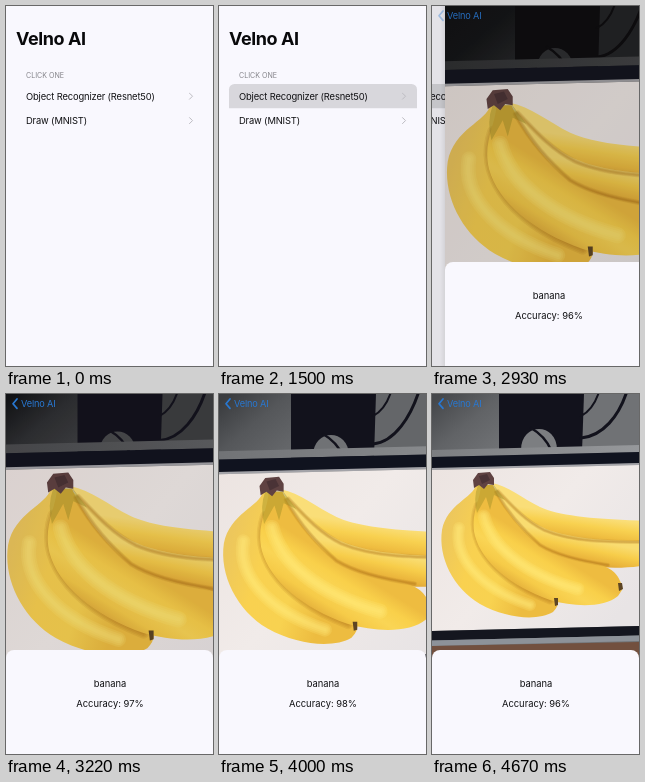
Write an HTML page with a canvas that moves like this. It is 207 by 360 pixels and loops after 4.69 s.

```html
<!DOCTYPE html>
<html lang="en">
<head>
<meta charset="utf-8">
<title>Image recognizer demo</title>
<style>
html, body { margin: 0; width: 100%; height: 100%; overflow: hidden; background: #f9f8fe; }
canvas { display: block; width: 207px; height: 360px; }
</style>
</head>
<body>
<canvas id="stage"></canvas>
<script>
const W = 207, H = 360, LOOP = 4690;
const TAP = 1000, PUSH = 2600;
const APP = 'Velno AI', PAGE = '#f9f8fe', BLUE = '#2878d2';
const canvas = document.getElementById('stage');
const ctx = canvas.getContext('2d');
const dpr = window.devicePixelRatio || 1;
canvas.width = W * dpr;
canvas.height = H * dpr;

// Camera: time, stem x, stem y, zoom, stand x, wall grey, shade
const CAMERA = [
  [2930, 54, 93, 1.25, 68, 32, 0.15],
  [3510, 53, 84, 1.26, 71, 88, 0.02],
  [4000, 52, 92, 1.15, 70, 100, 0],
  [4670, 51, 86, 1, 65, 112, 0]
];
const SCORES = [[0, 96], [3080, 97], [3300, 98], [3440, 99], [3860, 98], [4300, 97], [4600, 96]];

function cameraAt(t) {
  if (t <= CAMERA[0][0]) return CAMERA[0];
  for (let i = 1; i < CAMERA.length; i++) {
    const a = CAMERA[i - 1], b = CAMERA[i];
    if (t < b[0]) {
      const u = (t - a[0]) / (b[0] - a[0]);
      return a.map((v, k) => v + (b[k] - v) * u);
    }
  }
  return CAMERA[CAMERA.length - 1];
}

function pushAt(t) {
  const x = Math.max(0, t - PUSH) / 1000 * 13.5;
  return t > 3200 ? 1 : 1 - Math.exp(-x) * (1 + x);
}

function text(str, x, y, size, color, { weight = 400, spacing = -0.15, align = 'left' } = {}) {
  ctx.font = `${weight} ${size}px Inter, "Liberation Sans", sans-serif`;
  ctx.letterSpacing = spacing + 'px';
  ctx.textAlign = align;
  ctx.fillStyle = color;
  ctx.fillText(str, x, y);
}

function line(pts, color, width) {
  ctx.beginPath();
  pts.forEach(([x, y]) => ctx.lineTo(x, y));
  ctx.strokeStyle = color;
  ctx.lineWidth = width;
  ctx.lineCap = ctx.lineJoin = 'round';
  ctx.stroke();
}

function round(x, y, w, h, radii, color) {
  ctx.beginPath();
  ctx.roundRect(x, y, w, h, radii);
  ctx.fillStyle = color;
  ctx.fill();
}

function shape(d, fill) {
  ctx.fillStyle = fill;
  ctx.fill(new Path2D(d));
}

function curve(d, color, width) {
  ctx.strokeStyle = color;
  ctx.lineWidth = width;
  ctx.lineCap = 'round';
  ctx.stroke(new Path2D(d));
}

// Stacked translucent strokes give a soft band
function glow(d, color, width) {
  for (let i = 1; i <= 4; i++) curve(d, color, width * i / 4);
}

function ramp(x0, y0, x1, y1, ...colors) {
  const g = ctx.createLinearGradient(x0, y0, x1, y1);
  colors.forEach((c, i) => g.addColorStop(i / (colors.length - 1), c));
  return g;
}

// Horizontal strip following the tablet's slight tilt
function strip(top, bottom, color, tilt = 5) {
  const k = tilt / W, l = -60, r = 270;
  shape(`M${l} ${top - l * k}L${r} ${top - r * k}L${r} ${bottom - r * k}L${l} ${bottom - l * k}Z`, color);
}

function drawList(t, p) {
  ctx.fillStyle = PAGE;
  ctx.fillRect(0, 0, W, H);
  ctx.save();
  ctx.translate(-62 * p, 0);
  ctx.globalAlpha = Math.max(0, 1 - p * 1.6);
  text(APP, 10, 39, 18, '#09090b', { weight: 700, spacing: -0.4 });
  ctx.globalAlpha = 1;
  text('CLICK ONE', 20, 72.3, 7.1, '#85848a', { spacing: 0 });
  if (t >= TAP) round(10, 78, 188, 24.3, [5.5, 5.5, 0, 0], '#d8d7dc');
  ['Object Recognizer (Resnet50)', 'Draw (MNIST)'].forEach((label, i) => {
    const y = 90.2 + i * 24.4;
    text(label, 20, y + 3.4, 9.4, '#111114');
    line([[183.5, y - 3], [186.5, y], [183.5, y + 3]], '#bdbcc2', 1);
  });
  ctx.restore();
  if (p > 0) {
    ctx.fillStyle = `rgba(0,0,0,${0.09 * p})`;
    ctx.fillRect(0, 0, W, H);
  }
}

function drawBananas() {
  const dark = 'rgba(160,102,22,0.13)', light = 'rgba(255,232,125,0.2)';
  // back pair
  shape('M60 89C76 92 90 104 108 113C128 122 160 125 218 127V150C180 150 140 150 112 136C88 124 70 106 60 89Z',
    ramp(150, 121, 146, 150, '#fade78', '#f8d150', '#efbd40', '#d39b36'));
  shape('M58 91C72 100 84 117 101 128C124 143 160 147 218 147V170C200 175 160 176 126 166C92 152 70 122 58 91Z',
    ramp(150, 144, 144, 173, '#f9dc70', '#f7cd4a', '#eab43b', '#cc9232'));
  glow('M66 97C82 114 94 127 112 136C140 148 178 148 212 148', dark, 4);

  // left
  shape('M44 91C41 104 15 110 10 136C6 163 21 194 48 210C75 225 106 227 121 218Q127 212 126 206C95 198 68 182 55 160C45 138 50 112 54 91Z',
    ramp(8, 155, 100, 185, '#edc75c', '#f9d150', '#f8d250', '#edbc40'));
  glow('M27 134C22 162 46 194 98 211', light, 12);
  glow('M46 112C36 142 52 180 118 206', dark, 9);

  // front
  shape('M49 91C48 108 38 120 43 142C50 168 78 192 118 206C142 213 172 214 186 202L190 196L189 189C184 176 176 171 150 167C122 161 104 151 91 136C77 121 66 104 61 91Z',
    ramp(124, 160, 98, 202, '#eebc40', '#f9d04a', '#fad555', '#f6cb48', '#e3ae3a'));
  glow('M52 122C59 151 90 180 146 195', light, 13);
  glow('M64 98C77 121 91 136 108 151C124 161 148 167 176 171', dark, 4);

  // necks, stem and tips
  shape('M46 91L61 90L73 106L62 101L58 116L54 103L45 119Q41 104 46 91Z', 'rgba(150,138,34,0.4)');
  shape('M41 86L46 79L58 78L62 84L62 91L56 90L52 95L47 91L42 94Z', '#5f4242');
  shape('M47 82L55 80L58 86L50 90Z', '#4a3336');
  shape('M122 204L126 204L126 211L123 212Z', '#5d4524');
  shape('M186 189L190 189L191 195L187 197Z', '#5d4524');
}

function drawStand(x, base, ink, gap) {
  shape(`M${x + 2} 0h85l-2 ${base + 8}h-83z`, ink);
  shape(`M${x + 24} ${base + 6}C${x + 24} ${base - 22} ${x + 60} ${base - 22} ${x + 60} ${base + 6}Z`, gap);
  curve(`M${x + 34} ${base - 16}Q${x + 48} ${base - 8} ${x + 54} ${base + 6}`, ink, 2.5);
  curve(`M${x + 84} ${base - 6}C${x + 106} ${base - 8} ${x + 122} 22 ${x + 130} -3`, ink, 3);
  curve(`M${x + 84} 22Q${x + 96} 16 ${x + 102} -2`, ink, 2);
}

function drawCamera(t) {
  const [, sx, sy, zoom, standX, wall, shade] = cameraAt(t);
  const grey = (d) => {
    const v = Math.max(14, Math.round(wall + d));
    return `rgb(${v},${v + 2},${v + 5})`;
  };
  ctx.save();
  ctx.beginPath();
  ctx.rect(0, 0, W, 268);
  ctx.clip();
  ctx.fillStyle = ramp(10, 0, 60, 60, grey(-42), grey(-15), grey(0));
  ctx.fillRect(0, 0, W, 268);
  drawStand(standX, sy - 36, wall < 60 ? '#0a0a0e' : '#12121c', grey(12));

  ctx.translate(sx, sy);
  ctx.scale(zoom, zoom);
  ctx.translate(-51, -86);
  strip(56, 63, ramp(0, 56, W, 56, grey(12), grey(38)));
  strip(63, 74.5, '#10131f');
  strip(74, 76, '#a3a3a8');
  strip(76, 237, ramp(0, 80, 180, 230, '#ece4e1', '#f1ebe9', '#e8e4e5'));
  strip(237, 246.5, '#14161f');
  strip(246.5, 252, '#8d9299');
  strip(252, 300, '#72503f', 4);
  drawBananas();
  ctx.restore();

  if (shade > 0) {
    ctx.fillStyle = `rgba(28,20,16,${shade})`;
    ctx.fillRect(0, 0, W, 268);
  }
  round(0, 256, W, 112, 8, PAGE);
  const score = SCORES.filter(([at]) => at <= t).pop()[1];
  const label = { align: 'center', spacing: 0 };
  text('banana', 104, 292.5, 9.4, '#111114', label);
  text(`Accuracy: ${score}%`, 104, 312.5, 9.4, '#111114', label);
}

function drawBack(p) {
  ctx.globalAlpha = Math.max(0, Math.min(1, p * 2 - 1));
  text(APP, 15, 13, 9.2, BLUE);
  ctx.globalAlpha = p < 1 ? Math.max(0, (p - 0.9) * 10) : 1;
  line([[11, 5], [7, 9.7], [11, 14.4]], BLUE, 1.7);
  ctx.globalAlpha = 1;
}

function draw(t) {
  const p = pushAt(t);
  ctx.setTransform(dpr, 0, 0, dpr, 0, 0);
  if (p < 1) drawList(t, p);
  if (p > 0) {
    ctx.save();
    ctx.translate(W * (1 - p), 0);
    if (p < 1) {
      ctx.fillStyle = ramp(-5, 0, 0, 0, 'rgba(0,0,0,0)', 'rgba(0,0,0,0.07)');
      ctx.fillRect(-5, 0, 5, H);
    }
    drawCamera(t);
    ctx.restore();
    drawBack(p);
  }
}

const start = performance.now();
function tick() {
  draw((performance.now() - start) % LOOP);
  requestAnimationFrame(tick);
}
tick();
</script>
</body>
</html>
```
